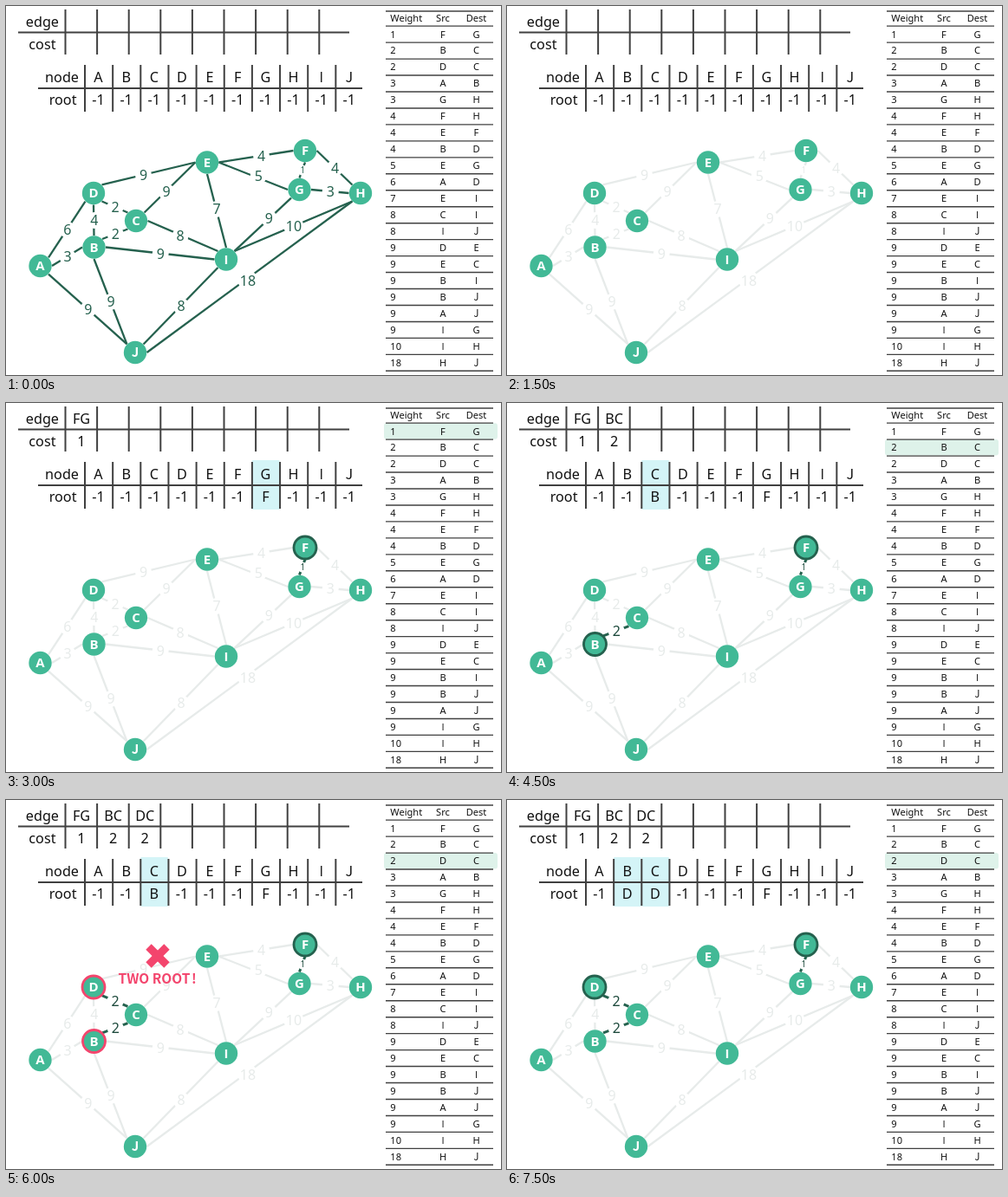
An HTML page that plays this animation: 571 px wide and 426 px high, repeating every 8000 ms.

```html
<!DOCTYPE html>
<html lang="en">
<head>
<meta charset="utf-8">
<title>Minimum spanning tree</title>
<style>
html, body { margin: 0; width: 100%; height: 100%; overflow: hidden; background: #fff; }
svg { display: block; width: 571px; height: 426px; font-family: "Noto Sans", sans-serif; }
.plain { font-family: "Open Sans", sans-serif; }
.narrow { font-family: "Noto Sans CJK SC", "Noto Sans CJK JP", sans-serif; }
</style>
</head>
<body>
<svg id="stage" viewBox="0 0 571 426"></svg>
<script>
const INK = '#404040', TEXT = '#111', GREEN = '#42b996', DEEP = '#25614e',
      PALE = '#e7ebea', PINK = '#f3456d', CYAN = '#d4f4f7';
const LETTERS = [...'ABCDEFGHIJ'];
const FACES = { I: 'plain', J: 'narrow' };
const RADIUS = 13.5;

const nodes = {
  A: [39.5, 300], B: [101.5, 278.5], C: [150, 248], D: [101, 216], E: [232, 180.5],
  F: [345, 167], G: [338.5, 212], H: [409, 216], I: [254, 292.5], J: [149, 400]
};

// Weight, ends, attachment points in eighths of a turn clockwise from the right, label nudge
const edges = [
  [1, 'FG', 2, 6], [2, 'BC', 7, 3], [2, 'DC', 1, 5], [3, 'AB', 0, 4], [3, 'GH', 0, 4],
  [4, 'FH', 0, 5], [4, 'EF', 0, 4, 6, -1], [4, 'BD', 6, 2], [5, 'EG', 0, 4, 6, 0], [6, 'AD', 7, 3],
  [7, 'EI', 2, 6, 0, -2], [8, 'CI', 0, 5, -3, 0], [8, 'IJ', 3, 7], [9, 'DE', 7, 4, -6, 2],
  [9, 'EC', 4, 7, -4, 5], [9, 'BI', 0, 4], [9, 'BJ', 2, 5], [9, 'AJ', 1, 5],
  [9, 'IG', 7, 3, 7, -7], [10, 'IH', 7, 3], [18, 'HJ', 3, 0, -2, 4]
];

const scenes = [
  { until: 1500, bright: true },
  { until: 3000 },
  { until: 4500, steps: 1, roots: { G: 'F' }, cells: 'G', ringed: 'F' },
  { until: 6000, steps: 2, roots: { G: 'F', C: 'B' }, cells: 'C', ringed: 'FB' },
  { until: 7500, steps: 3, roots: { G: 'F', C: 'B' }, cells: 'C', ringed: 'F', conflict: 'DB' },
  { until: 8000, steps: 3, roots: { G: 'F', B: 'D', C: 'D' }, cells: 'BC', ringed: 'FD' }
];

const line = (x1, y1, x2, y2, color = INK, width = 2) =>
  `<path d="M${x1} ${y1}L${x2} ${y2}" stroke="${color}" stroke-width="${width}"/>`;
const rect = (x, y, w, h, fill, rx = 0) =>
  `<rect x="${x}" y="${y}" width="${w}" height="${h}" rx="${rx}" fill="${fill}"/>`;
const circle = ([x, y], r, fill, stroke = 'none') =>
  `<circle cx="${x}" cy="${y}" r="${r}" fill="${fill}" stroke="${stroke}" stroke-width="2.8"/>`;
const text = (s, x, y, size,
  { anchor = 'middle', fill = TEXT, weight = 500, face = FACES[s] || '' } = {}) =>
  `<text x="${x}" y="${y}" font-size="${size}" text-anchor="${anchor}" fill="${fill}" ` +
  `font-weight="${weight}" class="${face}">${s}</text>`;

function port(name, eighth) {
  const [x, y] = nodes[name], angle = eighth * Math.PI / 4;
  return [x + RADIUS * Math.cos(angle), y + RADIUS * Math.sin(angle)];
}

function edgeTable(steps) {
  let out = text('edge', 61, 24, 16.2, { anchor: 'end' }) +
            text('cost', 57.5, 50, 16.2, { anchor: 'end' }) + line(14, 30.5, 396, 30.5);
  for (let i = 0; i < 9; i++) {
    const x = 68.5 + i * 36.6;
    out += line(x, 4, x, 56);
    if (i < steps) {
      out += text(edges[i][1], x + 18.5, 24, 16.2) + text(edges[i][0], x + 18.5, 50, 16.2);
    }
  }
  return out;
}

function rootTable(roots, cells) {
  const left = i => 91 + i * 32.15;
  let out = '';
  LETTERS.forEach((name, i) => {
    if (cells.includes(name)) out += rect(left(i), 66, 31.5, 57, CYAN);
  });
  out += text('node', 84, 87.8, 16.2, { anchor: 'end' }) +
         text('root', 81.5, 114, 16.2, { anchor: 'end' }) + line(37, 95, 411, 95);
  LETTERS.forEach((name, i) => {
    const x = left(i);
    out += line(x, 68, x, 122) + text(name, x + 15.5, 87.8, 16.2) +
           text(roots[name] || '-1', x + 15.5, 114, 16.2);
  });
  return out;
}

function weightTable(selected) {
  const ruleY = i => 4.2 + i * 18.96;
  const row = (cells, y) => text(cells[0], 443.3, y, 11.1, { anchor: 'start' }) +
    text(cells[1], 504, y, 11.1) + text(cells[2], 542.5, y, 11.1);
  let out = selected ? rect(436, ruleY(selected), 131, 18.5, '#def2ea', 3) : '';
  out += line(438, 6, 562, 6, INK, 1.4);
  for (let i = 1; i <= 22; i++) out += line(438, ruleY(i), 562, ruleY(i), INK, 1.4);
  out += row(['Weight', 'Src', 'Dest'], 17.6);
  edges.forEach(([weight, ends], i) => { out += row([weight, ...ends], 36.5 + i * 18.98); });
  return out;
}

function graph({ bright, steps = 0, ringed = '', conflict = '' }) {
  let lines = '', labels = '';
  edges.forEach(([weight, ends, from, to, dx = 0.5, dy = 0.3], i) => {
    const a = port(ends[0], from), b = port(ends[1], to);
    const active = i < steps, small = weight === 1;
    const color = active || bright ? DEEP : PALE;
    const x = (a[0] + b[0]) / 2 + dx, y = (a[1] + b[1]) / 2 + dy;
    const size = small ? 10 : 16;
    lines += line(...a, ...b, color, active ? 3 : 2.3);
    labels += circle([x, y], small ? 6 : 9.5 + (weight > 9 ? 2 : 0), '#fff') +
      text(weight, x, y + size * 0.36, size, { fill: active ? '#1d4a3c' : color, weight: active ? 500 : 400 });
  });
  let discs = '';
  for (const name of LETTERS) {
    const [x, y] = nodes[name];
    const ring = conflict.includes(name) ? PINK : ringed.includes(name) ? DEEP : 'none';
    discs += circle([x, y], RADIUS - (ring === 'none' ? 0.3 : 0.5), GREEN, ring) +
      text(name, x, y + 5.3, 15, { fill: '#fff', weight: 700 });
  }
  return lines + labels + discs;
}

function warning() {
  const style = { anchor: 'start', fill: PINK, weight: 700, face: 'narrow' };
  return line(164.5, 169.5, 185.5, 190.5, PINK, 9) + line(185.5, 169.5, 164.5, 190.5, PINK, 9) +
    text('TWO ROOT', 129.5, 212, 15.5, style) + text('!', 214, 212, 15.5, style);
}

const stage = document.getElementById('stage');
let shown;

function tick(now) {
  const scene = scenes.find(s => now % 8000 < s.until);
  if (scene !== shown) {
    shown = scene;
    const { steps = 0, roots = {}, cells = '', conflict } = scene;
    stage.innerHTML = edgeTable(steps) + rootTable(roots, cells) + weightTable(steps) +
      graph(scene) + (conflict ? warning() : '');
  }
  requestAnimationFrame(tick);
}
tick(performance.now());
</script>
</body>
</html>
```
